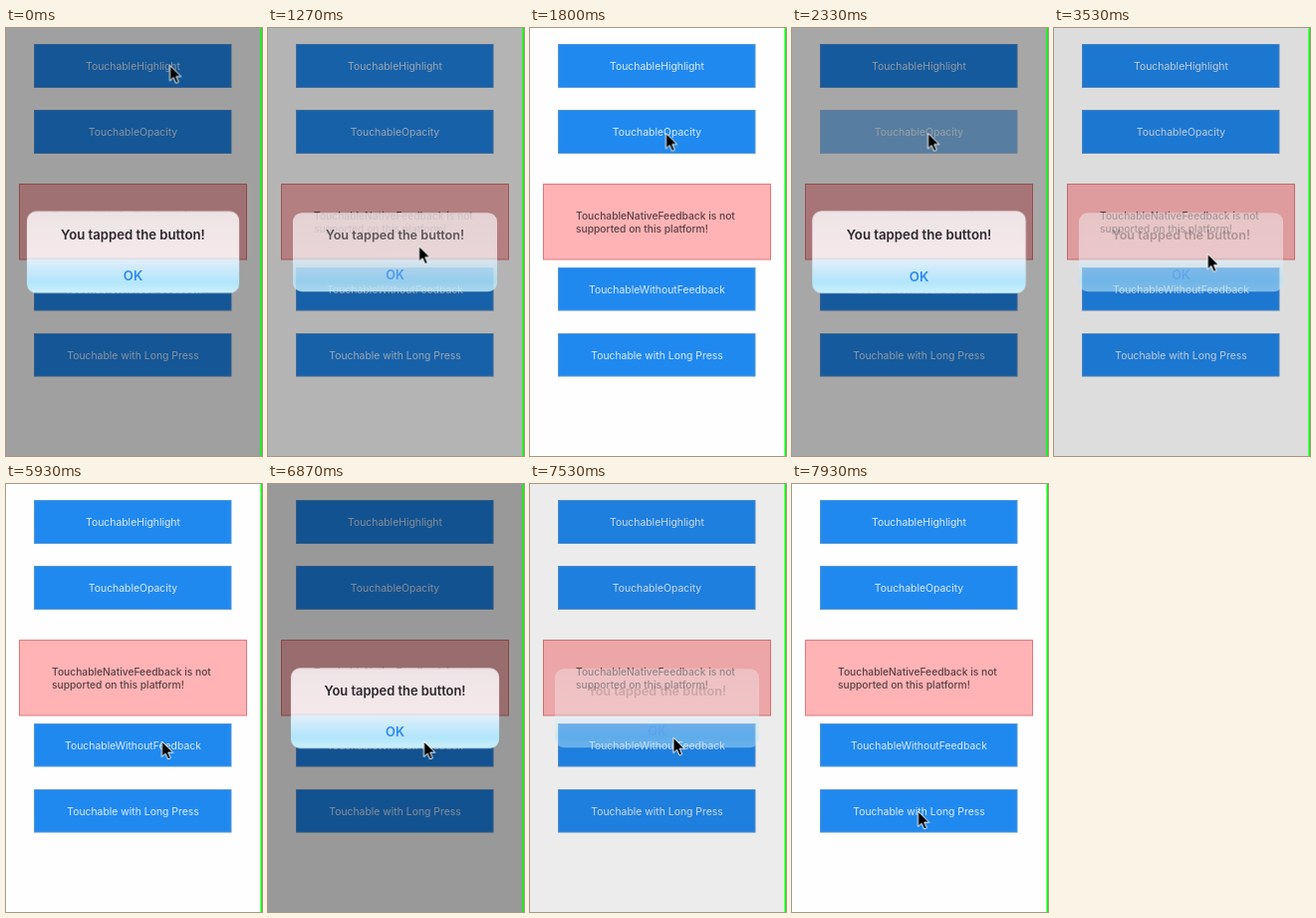
Write an HTML page that moves like this. It is 257 px wide and 429 px high and loops after 8000 ms.

```html
<!DOCTYPE html>
<html lang="en">
<head>
<meta charset="utf-8">
<title>Touchables</title>
<style>
  html, body { margin: 0; width: 100%; height: 100%; overflow: hidden; background: #fefefe; }
  svg { display: block; width: 257px; height: 429px; font: 10.4px Inter, Roboto, sans-serif; }

  .buttons rect { fill: #2089ef; stroke: #5796d6; }
  .buttons text { fill: #dcebfc; text-anchor: middle; }
  .notice rect { fill: #ffb3b5; stroke: #e3787b; }
  .notice text { fill: #5a4044; font-size: 10.25px; font-weight: 500; }
  .alert text { font-size: 12.65px; font-weight: 600; text-anchor: middle; }

  .dim, .fade, .pop, .press, .cursor { animation: 8s ease-in-out infinite; }
  .dim { animation-name: dim; }
  .fade { animation-name: fade; }
  .card { animation-timing-function: ease-in; }
  .pop { animation-name: pop; transform-origin: 127.5px 224.7px;
         animation-timing-function: cubic-bezier(.215, .61, .355, 1); }
  .press { animation-name: press; }
  .cursor { animation-name: move; }

  @keyframes dim {
    0% { opacity: .93; }
    2%, 14.1% { opacity: 1; }
    19.1% { opacity: 0; }
    26.8% { opacity: 0; animation-timing-function: linear; }
    29.5%, 41.1% { opacity: 1; }
    46.1% { opacity: 0; }
    82.5% { opacity: 0; animation-timing-function: linear; }
    85.2%, 90.6% { opacity: 1; }
    95.6%, 100% { opacity: 0; }
  }
  @keyframes fade {
    0%, 14.1% { opacity: 1; }
    19.1% { opacity: 0; }
    26.8% { opacity: 0; animation-timing-function: ease-out; }
    29%, 41.1% { opacity: 1; }
    46.1% { opacity: 0; }
    82.5% { opacity: 0; animation-timing-function: ease-out; }
    84.7%, 90.6% { opacity: 1; }
    95.6%, 100% { opacity: 0; }
  }
  @keyframes pop {
    0% { transform: scale(1.04); }
    3.66%, 26.79% { transform: scale(1); }
    26.8% { transform: scale(1.2); }
    33.05%, 82.49% { transform: scale(1); }
    82.5% { transform: scale(1.2); }
    88.75%, 100% { transform: scale(1); }
  }
  @keyframes press {
    0%, 23.6% { opacity: 1; }
    25%, 27.4% { opacity: .2; }
    31.2%, 100% { opacity: 1; }
  }
  @keyframes move {
    0%, 5% { transform: translate(164.5px, 37.5px); }
    10.9% { transform: translate(148px, 246px); }
    14.1% { transform: translate(148px, 246px); animation-timing-function: ease-in; }
    15.875% { transform: translate(151.5px, 219px); animation-timing-function: ease-out; }
    21.9%, 32.5% { transform: translate(136.5px, 105.5px); }
    38.75% { transform: translate(147px, 245px); }
    41.9% { transform: translate(147px, 245px); animation-timing-function: ease-in; }
    44.125% { transform: translate(154.5px, 226.5px); animation-timing-function: ease-out; }
    54.1%, 58.4% { transform: translate(33px, 190px); }
    66.6%, 70% { transform: translate(229px, 184px); }
    74.1%, 86.9% { transform: translate(156.5px, 258px); }
    89.4%, 92.75% { transform: translate(146px, 245px); }
    98.75%, 100% { transform: translate(126.5px, 328px); }
  }
</style>
</head>
<body>
<svg viewBox="0 0 257 429">
  <defs>
    <linearGradient id="glass" x2="0" y2="1">
      <stop offset="0" stop-color="#eee4e6"/>
      <stop offset=".57" stop-color="#f6e9ec"/>
      <stop offset=".59" stop-color="#e4f0fa"/>
      <stop offset=".7" stop-color="#cdebfb"/>
      <stop offset=".87" stop-color="#b2e6fb"/>
      <stop offset="1" stop-color="#cef1fc"/>
    </linearGradient>
  </defs>

  <g class="buttons">
    <g>
      <rect x="28.5" y="16.5" width="197.5" height="43"/>
      <text x="127.5" y="42">TouchableHighlight</text>
    </g>
    <g class="press">
      <rect x="28.5" y="82.5" width="197.5" height="43"/>
      <text x="127.5" y="108">TouchableOpacity</text>
    </g>
    <g>
      <rect x="28.5" y="240.5" width="197.5" height="42.5"/>
      <text x="127.5" y="265.5">TouchableWithoutFeedback</text>
    </g>
    <g>
      <rect x="28.5" y="306.5" width="197.5" height="42.5"/>
      <text x="127.5" y="331.7">Touchable with Long Press</text>
    </g>
  </g>

  <g class="notice">
    <rect x="13.5" y="156.5" width="228" height="75.5"/>
    <text x="46" y="191.7">TouchableNativeFeedback is not</text>
    <text x="46" y="204.7">supported on this platform!</text>
  </g>

  <rect class="dim" width="257" height="429" fill-opacity=".4"/>

  <g class="alert pop">
    <g class="fade card">
      <rect x="25" y="185.2" width="205" height="79" rx="9" fill="url(#glass)"/>
      <path d="M25 231h205" stroke="#c9ccd6" stroke-width=".7"/>
    </g>
    <g class="fade">
      <text x="127.5" y="212.3" fill="#2b272b">You tapped the button!</text>
      <text x="127.5" y="252.3" fill="#2f88ee">OK</text>
    </g>
  </g>

  <rect x="255.5" width="1.5" height="429" fill="#0f0"/>
  <path class="cursor" d="M0 0V15.5l3.6-3.4 2.5 5.7 2.7-1.1-2.5-5.6h5z" stroke="#fff"/>
</svg>
</body>
</html>
```
